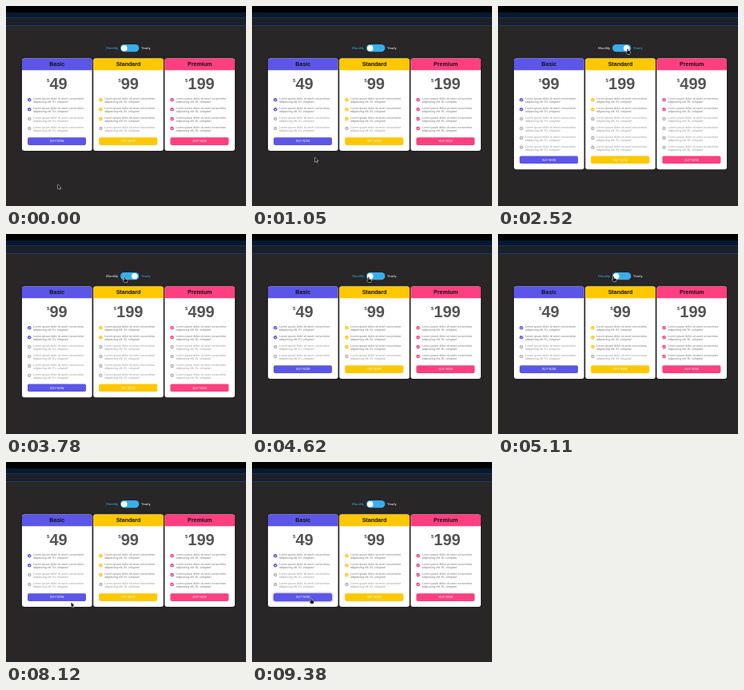
Recreate the animation shown at these times as an HTML page with a canvas. Size 300 by 250 pixels, loop 9450 ms.

```html
<!DOCTYPE html>
<html lang="en">
<head>
<meta charset="utf-8">
<title>Pricing toggle</title>
<style>
html, body { margin: 0; width: 100%; height: 100%; overflow: hidden; background: #282627; }
canvas { display: block; width: 300px; height: 250px; }
</style>
</head>
<body>
<canvas id="stage"></canvas>
<script>
const LOOP = 9450, STEP = 70, ON = 2170, OFF = 4200, SLIDE = 280;
const FONT = '"Liberation Sans", Arial, sans-serif';
const BLUE = '#38aeea', GREY = '#b5b5b5';
const plans = [
  { name: 'Basic', color: '#5b56e8', x: 20, price: ['49', '99'], active: [2, 2] },
  { name: 'Standard', color: '#ffc800', x: 109.2, price: ['99', '199'], active: [3, 2] },
  { name: 'Premium', color: '#ff3f80', x: 198.4, price: ['199', '499'], active: [4, 2] }
];
// Pointer path: time, x, y of the tip
const path = [
  [0, 65, 223], [560, 65, 222], [910, 69, 206], [1400, 118, 122], [1820, 157, 58],
  [1960, 162, 53], [2600, 162, 53.5], [3300, 154, 54], [3780, 148.5, 54], [4500, 146, 54],
  [5110, 144.5, 53], [5320, 150, 65], [5740, 192, 142], [6150, 226, 184], [6580, 243.5, 169],
  [6930, 242, 169], [7600, 150, 169], [8120, 81.5, 175.5], [8680, 79, 174], [9380, 74, 170.5]
];

const canvas = document.getElementById('stage');
const c = canvas.getContext('2d');
const dpr = window.devicePixelRatio || 1;
canvas.width = 300 * dpr;
canvas.height = 250 * dpr;
c.scale(dpr, dpr);

const clamp = v => Math.max(0, Math.min(1, v));
const ease = v => v * v * (3 - 2 * v);

function box(x, y, w, h, color, radius = 0) {
  c.fillStyle = color;
  c.beginPath();
  c.roundRect(x, y, w, h, radius);
  c.fill();
}

function text(s, x, y, size, color, align = 'left', weight = 'normal') {
  c.font = `${weight} ${size}px ${FONT}`;
  c.textAlign = align;
  c.fillStyle = color;
  c.fillText(s, x, y);
  return c.measureText(s).width;
}

function shadow(color, blur) {
  c.shadowColor = color;
  c.shadowBlur = blur * dpr;
}

function pointerAt(t) {
  const i = Math.max(1, path.findIndex(p => p[0] >= t));
  const [a, b] = [path[i - 1], path[i]];
  const k = ease(clamp((t - a[0]) / (b[0] - a[0])));
  return { x: a[1] + (b[1] - a[1]) * k, y: a[2] + (b[2] - a[2]) * k };
}

const inside = (p, x, y, w, h) => p.x >= x && p.x <= x + w && p.y >= y && p.y <= y + h;

function drawBackdrop() {
  box(0, 0, 300, 250, '#282627');
  box(0, 0, 300, 8, '#000');
  box(0, 8, 300, 6, '#08192f');
  box(0, 14, 300, 1, '#14305a');
  box(0, 15, 300, 9, '#1c2027');
  box(0, 24, 300, 1, '#1b3c70');
}

function drawToggle(slide, yearly) {
  text('Monthly', 140, 53.7, 4.2, yearly ? '#fff' : BLUE, 'right');
  text('Yearly', 169, 53.7, 4.2, yearly ? BLUE : '#fff');
  box(143, 48, 23.3, 9.3, BLUE, 4.65);
  box(144 + 13 * slide, 48.9, 7.5, 7.5, '#fff', 3.75);
}

function drawFeature(x, y, color, on) {
  box(x + 6.9, y - 1.3, 4.6, 4.6, on ? color : GREY, 2.3);
  c.strokeStyle = '#fff';
  c.lineWidth = 0.7;
  c.beginPath();
  if (on) {
    c.moveTo(x + 8.1, y + 1);
    c.lineTo(x + 9, y + 1.9);
    c.lineTo(x + 10.4, y + 0.2);
  } else {
    c.moveTo(x + 8.4, y + 0.2);
    c.lineTo(x + 10, y + 1.8);
    c.moveTo(x + 10, y + 0.2);
    c.lineTo(x + 8.4, y + 1.8);
  }
  c.stroke();
  const ink = on ? '#777' : '#999';
  text('Lorem ipsum dolor sit amet consectetur', x + 14, y + 1, 3.6, ink);
  text('adipisicing elit. Et, voluptas!', x + 14, y + 5, 3.6, ink);
}

function drawCard(plan, yearly, pointer) {
  const { x, color } = plan, w = 87.6, mid = x + w / 2;
  const rows = yearly ? 6 : 4, buttonY = yearly ? 187.4 : 164.2;
  shadow('rgba(0,0,0,.35)', 3);
  box(x, 65.5, w, buttonY - 48.7, '#fff', 3);
  shadow('transparent', 0);
  box(x, 65.5, w, 14.7, color, [3, 3, 0, 0]);
  text(plan.name, mid, 75.1, 7.1, '#111', 'center', 'bold');

  const price = plan.price[+yearly];
  c.font = `bold 20px ${FONT}`;
  const left = mid - (c.measureText(price).width + 3.5) / 2;
  text('$', left, 94.6, 6.2, '#555', 'left', 'bold');
  text(price, left + 3.5, 104.2, 20, '#555', 'left', 'bold');

  for (let i = 0; i < rows; i++) {
    drawFeature(x, 116.3 + i * 11.9, color, i < plan.active[+yearly]);
  }

  const hover = inside(pointer, x + 7, buttonY, 73, 9.7);
  if (hover) shadow(color, 3);
  box(x + 7, buttonY, 73, 9.7, color, 1.8);
  shadow('transparent', 0);
  text('BUY NOW', mid, buttonY + 6.2, 3.6, '#fff', 'center');
  return hover;
}

const arrow = new Path2D('M0 0V5.5L1.3 4.4L2.2 6.4L3.1 6L2.2 4H4Z');
const hand = new Path2D('M-.6 .3Q0 -.4 .6 .3V2.5L2.9 3Q3.5 3.2 3.3 4.2L2.7 6.6H-.3L-2 4.2Q-1.5 3.2 -.6 4Z');

function drawPointer(p, link) {
  const shape = link ? hand : arrow;
  c.save();
  c.translate(p.x, p.y);
  c.lineWidth = 1;
  c.strokeStyle = '#eee';
  c.stroke(shape);
  c.fillStyle = '#111';
  c.fill(shape);
  c.restore();
}

function draw(t) {
  const yearly = t >= ON && t < OFF;
  const slide = ease(clamp((t - ON) / SLIDE)) - ease(clamp((t - OFF) / SLIDE));
  const pointer = pointerAt(t);
  drawBackdrop();
  drawToggle(slide, yearly);
  const hovers = plans.map(plan => drawCard(plan, yearly, pointer));
  const link = hovers.includes(true) || inside(pointer, 143, 48, 23.3, 9.3);
  drawPointer(pointer, link);
}

const start = performance.now();
function tick() {
  const t = (performance.now() - start) % LOOP;
  draw(Math.floor(t / STEP) * STEP);
  requestAnimationFrame(tick);
}
tick();
</script>
</body>
</html>
```
